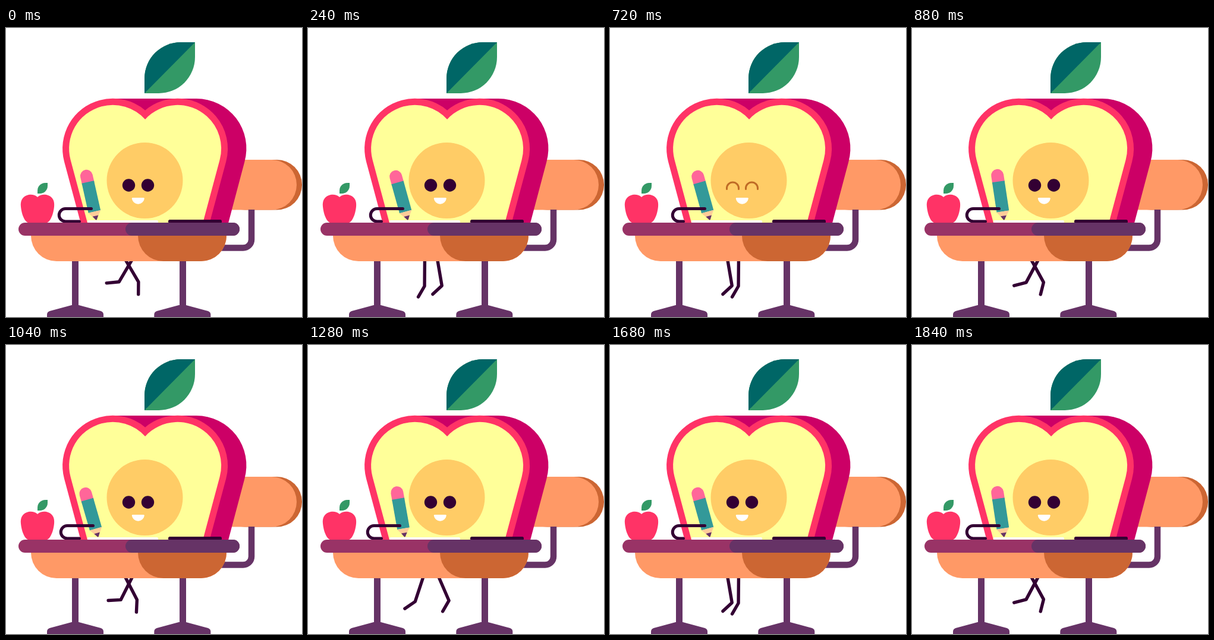
These frames come from a looping animation (498 by 487 pixels, 1.92 s). An HTML page with a canvas:

```html
<!DOCTYPE html>
<html lang="en">
<head>
<meta charset="utf-8">
<title>Apple at a desk</title>
<style>
html, body { margin: 0; width: 100%; height: 100%; overflow: hidden; background: #fff; }
canvas { display: block; }
</style>
</head>
<body>
<canvas id="stage" width="498" height="487"></canvas>
<script>
const ctx = document.getElementById('stage').getContext('2d');
const LOOP = 1920, STEP = 80, TAU = Math.PI * 2, RAD = Math.PI / 180;
const { sin, cos } = Math;

const C = {
  dark: '#330033', purple: '#663366', plum: '#993366', orange: '#ff9966',
  brown: '#cc6633', red: '#ff3366', magenta: '#cc0066', flesh: '#ffff99',
  core: '#ffcc66', pink: '#ff6699', teal: '#339999', wood: '#ffcc99',
  green: '#339966', deep: '#006666'
};

function fill(color, d) {
  ctx.fillStyle = color;
  ctx.fill(new Path2D(d));
}

function line(color, width, d, cap = 'round') {
  ctx.strokeStyle = color;
  ctx.lineWidth = width;
  ctx.lineCap = cap;
  ctx.lineJoin = 'round';
  ctx.stroke(new Path2D(d));
}

function disc(color, x, y, r) {
  ctx.fillStyle = color;
  ctx.beginPath();
  ctx.arc(x, y, r, 0, TAU);
  ctx.fill();
}

function box(color, x, y, w, h, r) {
  ctx.fillStyle = color;
  ctx.beginPath();
  ctx.roundRect(x, y, w, h, r);
  ctx.fill();
}

// Two round lobes joined at a notch, with sides tapering to the desk.
function heart(color, r) {
  const lx = 179.6, rx = 288.6, y = 203.3, base = 330, tilt = 15 * RAD;
  const mid = (lx + rx) / 2, notch = Math.acos((mid - lx) / r);
  const dx = r * cos(tilt), dy = r * sin(tilt);
  const inset = (base - y - dy) * Math.tan(tilt);
  ctx.fillStyle = color;
  ctx.beginPath();
  ctx.moveTo(lx - dx + inset, base);
  ctx.arc(lx, y, r, Math.PI - tilt, TAU - notch);
  ctx.arc(rx, y, r, Math.PI + notch, TAU + tilt);
  ctx.lineTo(rx + dx - inset, base);
  ctx.fill();
}

function drawChair() {
  box(C.brown, 360, 222, 138, 84.5, 42.2);
  box(C.orange, 340, 222, 149, 84.5, 42.2);
  line(C.purple, 10.5, 'M413 306V356.5A14 14 0 0 1 399 370.5H355', 'butt');
}

function drawLeaf() {
  fill(C.green, 'M233 110V85A61 61 0 0 1 294 24H318V49A61 61 0 0 1 257 110Z');
  fill(C.deep, 'M233 110V85A61 61 0 0 1 294 24H318Z');
}

function drawFace(t) {
  disc(C.core, 233.5, 257, 64);
  const smiling = t >= 640 && t < 880;
  for (const x of [206.5, 238.5]) {
    if (smiling) line('#bf6b26', 3, `M${x - 10} 271.5V270A10 10 0 0 1 ${x + 10} 270V271.5`);
    else disc(C.dark, x, 265, 10.7);
  }
  fill('#fff', 'M213 286H231.5Q233 286 232.8 287.5A10.6 10.6 0 0 1 211.8 287.5Q211.6 286 213 286Z');
}

function drawApple(t) {
  fill(C.magenta, 'M179 119H320A84 84 0 0 1 401.3 225.7L373.7 330H233Z');
  heart(C.red, 84.5);
  heart(C.flesh, 73.5);
  drawFace(t);
}

function drawLeg(hipX, p) {
  const thigh = RAD * (32 * cos(p) - 1.5 * cos(3 * p) + 4.6 * sin(p) ** 4 - 5.1 * sin(p) ** 3);
  const shin = RAD * (42 * cos(p) + 9.5 * sin(p) + sin(3 * p) - 2 * cos(2 * p) + 2.2 * cos(4 * p) - 42.7);
  const kx = hipX + 52 * sin(thigh), ky = 383 + 52 * cos(thigh);
  const fx = kx + 21 * sin(shin), fy = ky + 21 * cos(shin);
  line(C.dark, 5.4, `M${hipX} 383L${kx} ${ky}L${fx} ${fy}`);
}

function drawStand(postX, baseX) {
  box(C.purple, postX, 390, 11, 80, 0);
  fill(C.purple, `M${baseX - 6} 467H${baseX + 6}L${baseX + 43} 477Q${baseX + 47.5} 478.5 ${baseX + 47.5} 483V487H${baseX - 47.5}V483Q${baseX - 47.5} 478.5 ${baseX - 43} 477Z`);
}

function drawDesk() {
  drawStand(111, 116.5);
  drawStand(292, 296.8);
  box(C.orange, 42, 345, 329, 48, [0, 0, 43, 43]);
  box(C.brown, 222, 345, 149, 48, [0, 0, 43, 43]);
  box(C.plum, 21, 328, 372, 22, 11);
  box(C.purple, 201, 328, 192, 22, 11);
}

function drawSnack() {
  fill(C.red, 'M53 285C58 280 66 280 71 282C79 285 82 292 81 301C80 311 77 320 73 325Q70 328.5 66 328.5H40Q36 328.5 33 325C29 320 26 311 25 301C24 292 27 285 35 282C40 280 48 280 53 285Z');
  fill(C.green, 'M53 279V274A13 13 0 0 1 66 261H70V266A13 13 0 0 1 57 279Z');
}

function drawPencil(x, angle) {
  ctx.save();
  ctx.translate(x, 323.5);
  ctx.rotate(-angle * RAD);
  box(C.pink, -10.5, -86.5, 21, 24, [10.5, 10.5, 0, 0]);
  box(C.teal, -10.5, -65.5, 21, 51, 0);
  fill(C.wood, 'M-10.5 -14.5H10.5L4.5 -6H-4.5Z');
  fill(C.purple, 'M-5 -7H5L1 -0.5Q0 0.5 -1 -0.5Z');
  ctx.restore();
}

function drawWriting(t) {
  const p = t / 480 * TAU;
  const shift = 7.33 - 8 * cos(p) + 0.67 * cos(2 * p);
  const angle = 13.4 - 1.45 * cos(p) + 4.4 * sin(p) + 0.65 * cos(2 * p);
  box('#fff', 137, 324, 119, 5, 2);
  box(C.dark, 273, 323, 90, 6, 2.5);
  drawPencil(152 + shift, angle);
  line(C.dark, 5, `M${143.5 + shift} 304.5H${100 + shift}A10.7 10.7 0 0 0 ${100 + shift} 326H123.5`);
}

function draw(t) {
  ctx.fillStyle = '#fff';
  ctx.fillRect(0, 0, 498, 487);
  const p = t / 960 * TAU;
  drawChair();
  drawLeaf();
  drawApple(t);
  drawLeg(196.5, p);
  drawLeg(216.5, p + Math.PI);
  drawSnack();
  drawWriting(t);
  drawDesk();
}

const start = performance.now();
function tick(now) {
  const t = Math.max(0, now - start) % LOOP;
  draw(Math.floor(t / STEP) * STEP);
  requestAnimationFrame(tick);
}
draw(0);
requestAnimationFrame(tick);
</script>
</body>
</html>
```
